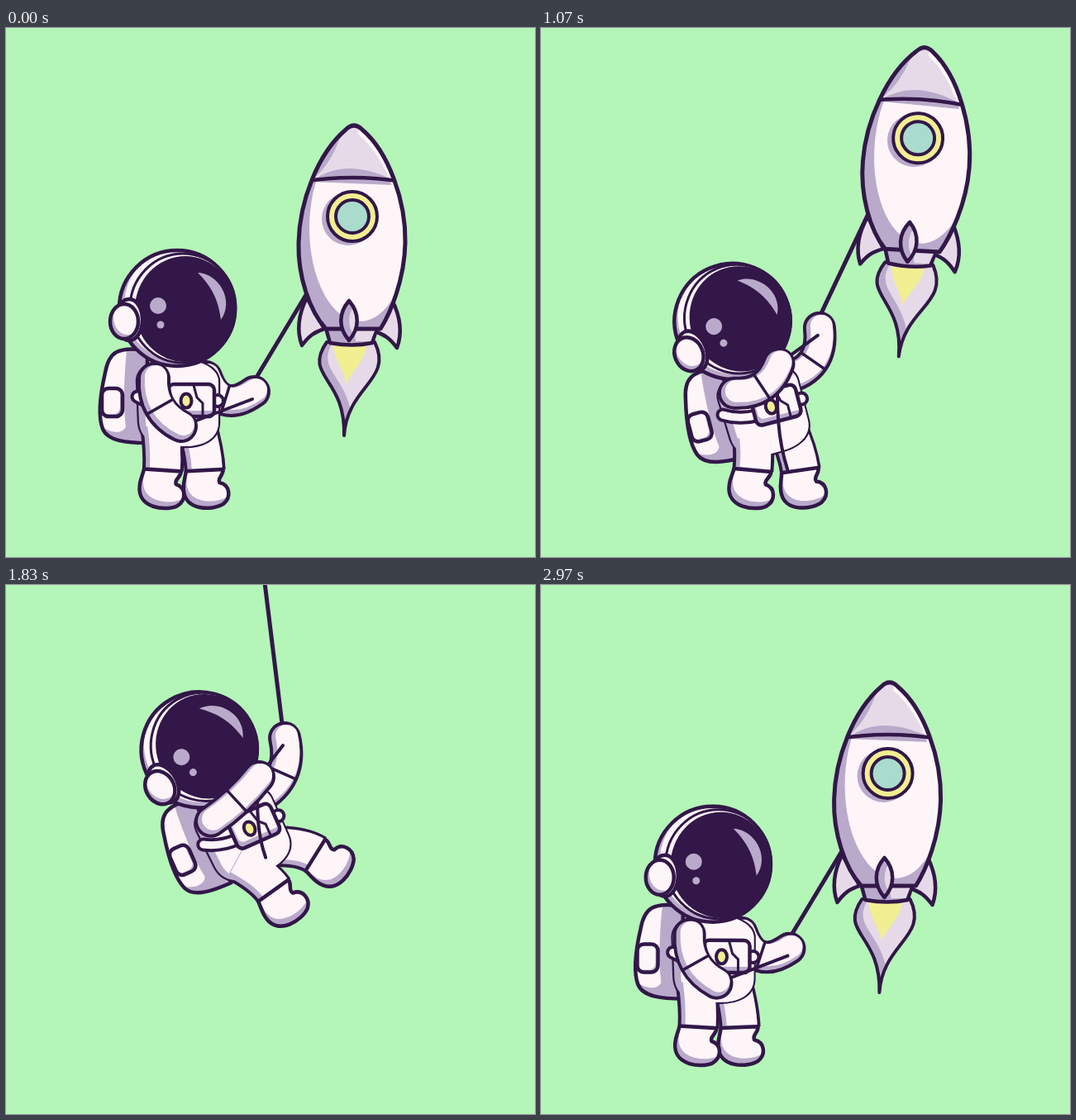
An HTML page with a canvas that plays this animation: 640x640 px, repeating every 3010 ms.

```html
<!DOCTYPE html>
<html lang="en">
<head>
<meta charset="utf-8">
<title>Astronaut with a rocket on a string</title>
<style>
html, body { margin: 0; height: 100%; overflow: hidden; background: #b4f5b8; }
canvas { display: block; }
</style>
</head>
<body>
<canvas id="stage" width="640" height="640"></canvas>
<script>
const ctx = document.getElementById('stage').getContext('2d');
const LOOP = 3010, GROUND = 535;
const INK = '#321748', WHITE = '#fdf5f8', SHADE = '#b9aacb', LILAC = '#e6dae8';
const YELLOW = '#f2ee92', TEAL = '#a9dccd', GREEN = '#b4f5b8';

// Smooth periodic motion through key points [time, ...values], without overshoot.
const slope = (p, q) => p * q <= 0 ? 0 : 2 * p * q / (p + q);
function track(...keys) {
  const n = keys.length;
  const key = j => {
    const [time, ...values] = keys[(j + n) % n];
    return [time + Math.floor(j / n) * LOOP, values];
  };
  return t => {
    const i = keys.findLastIndex(k => k[0] <= t);
    const [[t0, a], [t1, b], [t2, c], [t3, d]] = [-1, 0, 1, 2].map(k => key(i + k));
    const h = t2 - t1, u = (t - t1) / h;
    return b.map((v, k) => {
      const diff = c[k] - v, s = diff / h;
      const m0 = slope((v - a[k]) / (t1 - t0), s) * h;
      const m1 = slope(s, (d[k] - c[k]) / (t3 - t2)) * h;
      return v + u * (m0 + u * (3 * diff - 2 * m0 - m1 + u * (m0 + m1 - 2 * diff)));
    });
  };
}
const bump = (t, from, to) =>
  Math.sin(Math.PI * Math.min(1, Math.max(0, (t - from) / (to - from)))) ** 2;

// Body x, y, angle, head tilt; near and far hand; swing of near and far leg.
const pose = track(
  [0, 207, 452, 0, 0, 212, 482, 300, 440, -3, -11],
  [470, 244, 467, -5, 0, 252, 442, 312, 380, 1, -23],
  [830, 260, 450, 2, -25, 297, 394, 352, 352, 17, -9],
  [1330, 275, 475, -33, -21, 277, 420, 320, 375, -29, -36],
  [1830, 285, 300, -24, -30, 306, 232, 337, 185, -52, -80],
  [2230, 282, 425, 3, 4, 295, 382, 372, 347, -5, 0]);

// Rocket x, y, angle.
const rocket = track([0, 419, 250, 0], [220, 505, 215, 12], [470, 441, 199, -18.5], [830, 471, 151, 27],
  [1330, 420, 160, -23], [1830, 326, -294, -10], [2230, 471, -281, 5], [2690, 440, 248, 2]);
const looseString = track([0, 0], [470, 0], [830, 130], [2230, 75], [2900, 0]);

const RAD = Math.PI / 180;
function place([x, y, r], [px, py]) {
  const c = Math.cos(r * RAD), s = Math.sin(r * RAD);
  return [x + px * c - py * s, y + px * s + py * c];
}
function local([x, y, r], draw) {
  ctx.save();
  ctx.translate(x, y);
  ctx.rotate(r * RAD);
  draw();
  ctx.restore();
}
function stroke(path, width = 4.5, color = INK) {
  ctx.lineWidth = width;
  ctx.strokeStyle = color;
  ctx.stroke(path);
}
function fill(path, color) {
  ctx.fillStyle = color;
  ctx.fill(path);
}
function clipped(path, draw) {
  ctx.save();
  ctx.clip(path);
  draw();
  ctx.restore();
}
const P = d => new Path2D(d);
const line = (a, b) => P(`M${a}L${b}`);
const curve = (a, b, c) => P(`M${a}Q${b} ${c}`);
function oval(x, y, rx, ry = rx) {
  const p = new Path2D();
  p.ellipse(x, y, rx, ry, 0, 0, 7);
  return p;
}
function box(x, y, w, h, r) {
  const p = new Path2D();
  p.roundRect(x, y, w, h, r);
  return p;
}
function flat(path, color, width) {
  fill(path, color);
  stroke(path, width);
}
// The shade shows where the lit copy has moved away.
function lit(path, dx, dy, light = WHITE) {
  fill(path, SHADE);
  clipped(path, () => { ctx.translate(dx, dy); fill(path, light); });
}
function solid(path, dx, dy) {
  lit(path, dx, dy);
  stroke(path);
}
function limbInside(path, width) {
  stroke(path, width - 4, SHADE);
  ctx.save();
  ctx.translate(2.5, -2.5);
  stroke(path, width - 9, WHITE);
  ctx.restore();
}

const HULL = P('M-8-127Q2-137 12-127C44-100 65-40 64 10C63 55 46 95 34 114L-32 114C-52 92-66 50-65 10C-64-40-42-98-8-127Z');
const CAP = P('M-80-150H80V-62Q0-76-80-62Z');
const CAP_SHADE = P('M-60-60C-42-68-22-90-12-127L-50-120ZM-50-64Q-10-95 50-66L50-60Z');
const NOZZLE = P('M-34 106L-27 131Q0 136 24 131L32 106Z');
const FIN = P('M-55 76C-64 94-68 115-61 134C-52 122-46 118-34 114Z');
const KEEL = P('M-4 80C-17 95-17 113-4 128C9 113 9 95-4 80Z');
const PACK = P('M-36-62C-74-68-83-58-87-35C-95 0-95 20-90 33C-84 48-60 50-36 50Z');
const PACK_SHADE = P('M-30-70H-60C-66-20-64 15-62 30C-66 40-80 38-92 30L-90 60H-30Z');
const TRUNK = P('M-48-25C-48-60 48-60 50-25L50 25C50 46 30 55 5 54C-20 56-44 50-46 25Z');
const BOOT = P('M-23 0H22C22 8 14 10 17 16C29 19 31 34 20 42C8 49-28 49-27 21C-27 12-24 8-23 0Z');
const GLARE = P('M25-43C50-42 70-10 53 14C50-10 42-26 25-43Z');

function drawRocket(at) {
  const r = at[2], tip = r * r / 25 + r / 2 - 10; // the flame trails behind the tilt
  local(at, () => {
    const flame = P(`M-31 130C-60 172 ${tip + 2} 172 ${tip} 243C${tip + 4} 183 50 176 27 130Z`);
    lit(flame, 10, -4, LILAC);
    fill(P(`M-23 132H17C16 150 8 154 ${tip / 8 - 6} 180C-12 160-22 152-23 132Z`), YELLOW);
    stroke(flame, 4);
    flat(FIN, LILAC);
    local([-7, 3, 0], () => {
      ctx.scale(-1, 1);
      flat(FIN, LILAC);
    });
    flat(NOZZLE, SHADE);
    fill(P('M2 114H28L22 129H4Z'), LILAC);
    fill(HULL, SHADE);
    clipped(HULL, () => {
      fill(oval(9, -8, 61, 113), WHITE);
      fill(CAP, LILAC);
      fill(CAP_SHADE, SHADE);
      stroke(P('M10-124C42-96 58-50 60-20'), 7, WHITE);
      stroke(P('M-60-64Q0-74 60-64'));
    });
    stroke(HULL, 5);
    fill(oval(-5, -19, 32), SHADE);
    flat(oval(0, -22, 30), YELLOW, 4);
    flat(oval(0, -22, 20), TEAL, 4);
    lit(KEEL, 10, 0, LILAC);
    stroke(KEEL);
  });
}

function drawPack() {
  fill(PACK, WHITE);
  clipped(PACK, () => fill(PACK_SHADE, SHADE));
  stroke(PACK);
  solid(box(-91, -16, 25, 34, 8), -3, -3);
}

// Two equal arm halves decide how far the elbow bends out.
function drawArm([sx, sy], [hx, hy], half) {
  const dx = hx - sx, dy = hy - sy, len = Math.hypot(dx, dy);
  const bend = Math.sqrt(Math.max(0, half * half - len * len / 4));
  const nx = -dy / len, ny = dx / len;
  const mx = (sx + hx) / 2, my = (sy + hy) / 2;
  const path = curve([sx, sy], [mx + nx * bend, my + ny * bend], [hx, hy]);
  const cuff = k => [mx + nx * (bend / 2 + k), my + ny * (bend / 2 + k)];
  stroke(path, 40);
  limbInside(path, 36);
  stroke(line(cuff(-17), cuff(17)), 3.5);
}

// A leg stretches until its boot stands on the ground or the leg is straight.
function makeLeg(body, hipX, swing) {
  const hip = place(body, [hipX, 28]);
  const reach = Math.min(58, Math.max(20, (GROUND - hip[1]) / Math.cos(swing * RAD)));
  const cuff = [...place([...hip, swing], [0, reach]), swing * .8 + 6];
  return { cuff, thigh: curve(hip, place(cuff, [0, -22]), cuff.slice(0, 2)) };
}
function drawLeg({ cuff, thigh }, between = () => {}) {
  ctx.lineCap = 'butt';
  stroke(thigh, 50);
  between();
  limbInside(thigh, 46);
  ctx.lineCap = 'round';
  local(cuff, () => solid(BOOT, 4, -8));
}

function drawBelt() {
  const strap = P('M-48-6Q-30 5-8 5');
  stroke(strap, 17);
  stroke(strap, 9, WHITE);
  flat(oval(49, -1, 7), WHITE, 4);
  solid(box(-11, -21, 56, 39, 7), 4, -7);
  stroke(P('M20-20L24-5L31 2V17'), 3);
  flat(oval(11, -1, 6.5, 8.5), YELLOW, 4);
}

function drawHead() {
  solid(oval(0, 0, 70), 6, -4);
  flat(oval(7, 0, 64, 66), WHITE, 3);
  fill(oval(10, 1, 61, 64), INK);
  fill(oval(-23, -3, 10), SHADE);
  fill(oval(-20, 20, 4.5), SHADE);
  fill(GLARE, SHADE);
  solid(oval(-58, 14, 16, 25), 3, -3);
  solid(oval(-64, 16, 17, 21), 4, -5);
}

function drawFigure([x, y, r, tilt, nx, ny, fx, fy, nearSwing, farSwing], loose) {
  const body = [x, y, r], near = [nx, ny], far = [fx, fy];
  const neck = [x, y, (r + tilt) / 2];
  local(body, drawPack);
  drawArm(place(body, [35, -30]), far, 50);
  drawLeg(makeLeg(body, 23, farSwing));
  drawLeg(makeLeg(body, -20, nearSwing), () => local(body, () => {
    stroke(TRUNK);
    lit(TRUNK, 8, 0);
  }));
  local(body, drawBelt);
  stroke(line([fx - 2, fy + 9], near), 4);
  local([...place(neck, [0, -113]), tilt], drawHead);
  stroke(curve(near, [nx - 6, ny + loose * .6], [nx + loose / 12, ny + loose]), 4);
  drawArm(place(body, [-28, -28]), near, 40);
}

function frame(now) {
  const t = now % LOOP;
  ctx.fillStyle = GREEN;
  ctx.fillRect(0, 0, 640, 640);
  ctx.lineCap = ctx.lineJoin = 'round';

  const ship = rocket(t), figure = pose(t);
  // Late take-off, a deep landing and one step back.
  const dx = -36 * bump(t, 2640, 2970);
  const dy = 60 * bump(t, 1330, 1830) + 25 * bump(t, 1830, 2230);
  const grip = [figure[6] + dx - 2, figure[7] + dy - 9];
  stroke(line(grip, place(ship, [-52, 66])), 5);
  drawRocket(ship);
  local([dx, dy, 0], () => drawFigure(figure, looseString(t)[0]));
  requestAnimationFrame(frame);
}
requestAnimationFrame(frame);
</script>
</body>
</html>
```
